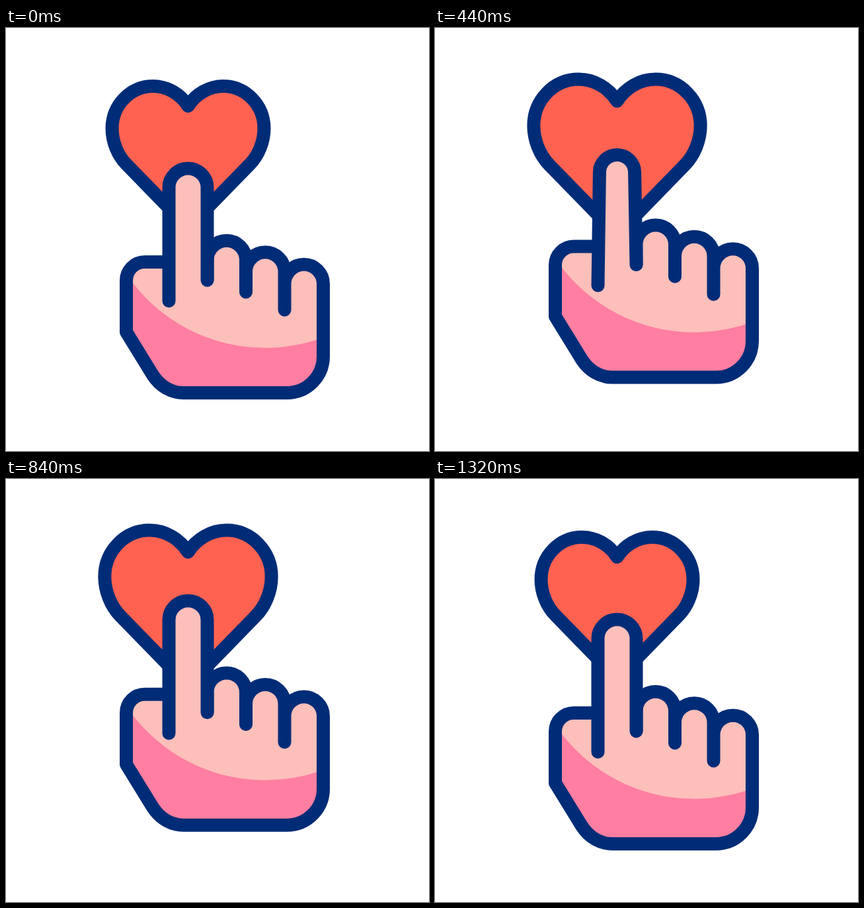
An HTML page for the animation above (1.4 s loop, 640 px wide and 640 px high).

```html
<!DOCTYPE html>
<html lang="en">
<head>
<meta charset="utf-8">
<title>Tap the heart</title>
<style>
  html, body { margin: 0; width: 100%; height: 100%; overflow: hidden; background: #fff; }
  svg { display: block; width: 100vw; height: 100vh; }
  .line { stroke: #002c77; stroke-width: 20; stroke-linecap: round; stroke-linejoin: round; }
  .none { fill: none; }
  .red { fill: #ff6251; }
  .skin { fill: #fcbfba; }
  .pink { fill: #ff7ea1; }
</style>
</head>
<body>
<svg viewBox="0 0 640 640">
  <path id="heart" class="line red" d="M275.5 118C264 100 244 88 222.5 88C188 88 160.5 117 160.5 152C160.5 172 169 193 182 206L275.5 302L369 206C382 193 390.5 172 390.5 152C390.5 117 363 88 328.5 88C307 88 287 100 275.5 118Z"/>
  <g id="hand">
    <path class="skin" d="M246.5 354H210A28 28 0 0 0 182 382V460L222 525C233 542 250 552 268 552H425A55 55 0 0 0 480 497V387A29.25 29.25 0 0 0 421.5 387V368.5A29.25 29.25 0 0 0 363 368.5V351A29.25 29.25 0 0 0 304.5 351V381.5Z"/>
    <path class="pink" d="M182 372A253 253 0 0 0 480 468.2V497A55 55 0 0 1 425 552H268C250 552 233 542 222 525L182 460Z"/>
    <path class="line none" d="M246.5 354H210A28 28 0 0 0 182 382V460L222 525C233 542 250 552 268 552H425A55 55 0 0 0 480 497V387A29.25 29.25 0 0 0 421.5 387M304.5 381.5V351A29.25 29.25 0 0 1 363 351V399.5M363 368.5A29.25 29.25 0 0 1 421.5 368.5V426.5"/>
    <path id="finger" class="line skin"/>
  </g>
</svg>
<script>
  const LOOP = 1400, STEP = 40;
  const [heart, hand, finger] = ['heart', 'hand', 'finger'].map(id => document.getElementById(id));

  const smooth = s => s * s * (3 - 2 * s);

  // cubic-bezier(x1, 0, x2, 1)
  const bezier = (x1, x2) => x => {
    let lo = 0, hi = 1;
    for (let i = 0; i < 24; i++) {
      const s = (lo + hi) / 2, r = 1 - s;
      if (3 * r * r * s * x1 + 3 * r * s * s * x2 + s * s * s < x) lo = s; else hi = s;
    }
    return smooth((lo + hi) / 2);
  };

  // Each key: [time, value, easing towards it]
  const tracks = {
    lift: [[20, 0], [560, 28.8, bezier(.7, .65)], [800, 28.8], [1340, 0, bezier(.35, .3)]],
    beat: [[320, 0], [520, .15], [720, 0], [920, .15], [1120, 0]],
    press: [[360, 0], [580, 1], [830, 0]]
  };

  function valueAt(keys, t) {
    if (t <= keys[0][0]) return keys[0][1];
    for (let i = 1; i < keys.length; i++) {
      const [t0, a] = keys[i - 1], [t1, b, ease = smooth] = keys[i];
      if (t <= t1) return a + (b - a) * ease((t - t0) / (t1 - t0));
    }
    return keys[keys.length - 1][1];
  }

  function draw(t) {
    const scale = 1 + valueAt(tracks.beat, t);
    heart.setAttribute('transform', `translate(275.5 195) scale(${scale}) translate(-275.5 -195)`);
    heart.style.strokeWidth = 20 / scale;

    hand.setAttribute('transform', `translate(0 ${-valueAt(tracks.lift, t)})`);

    const p = valueAt(tracks.press, t), r = 29 - 8 * p, y = 241.5 + 1.5 * p;
    finger.setAttribute('d',
      `M246.5 413L${275.5 - r} ${y}A${r} ${r} 0 0 1 ${275.5 + r} ${y}L304.5 381.5`);
  }

  const start = performance.now();
  function tick() {
    const t = (performance.now() - start) % LOOP;
    draw(Math.floor(t / STEP) * STEP);
    requestAnimationFrame(tick);
  }
  tick();
</script>
</body>
</html>
```
